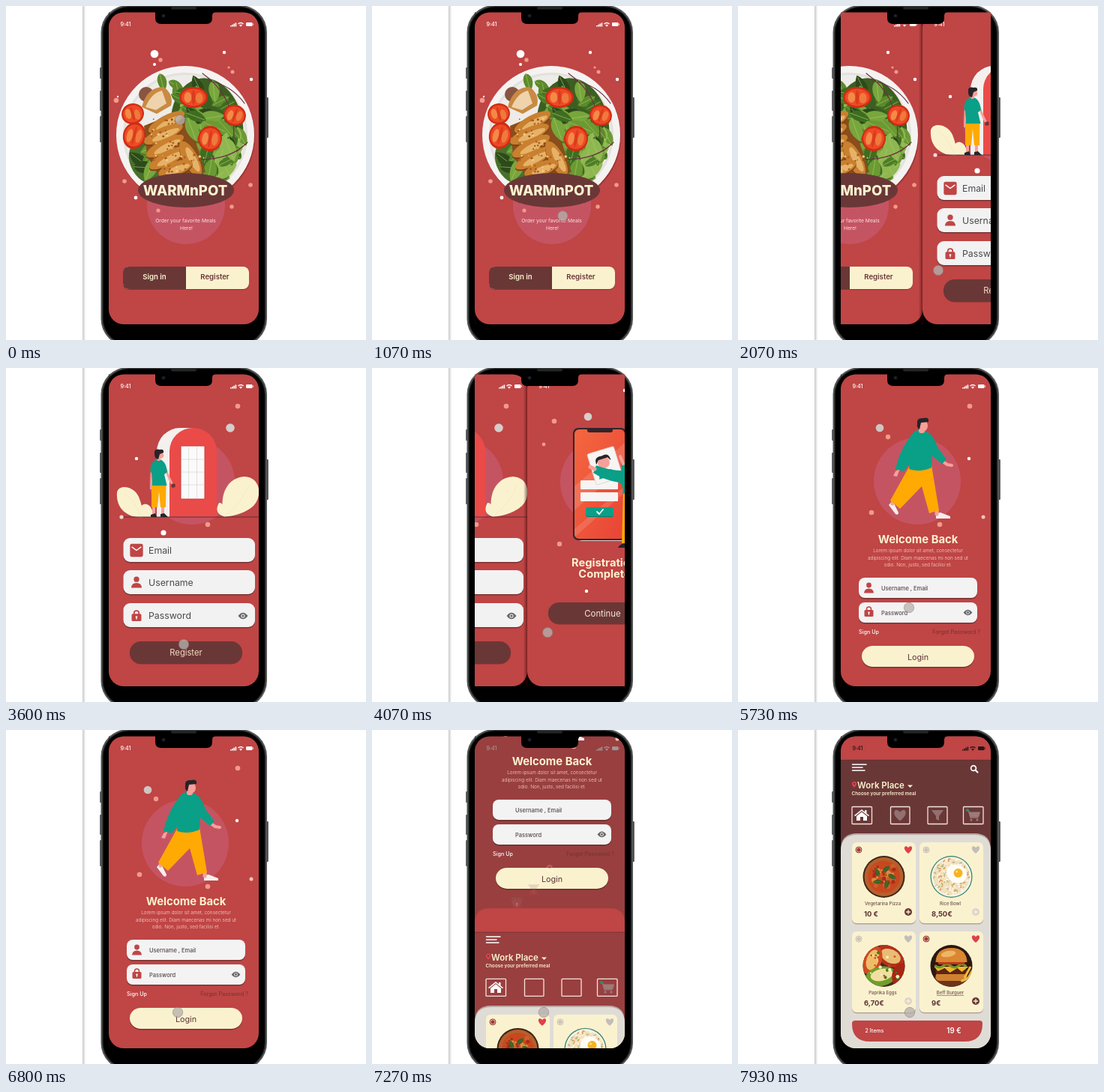
These frames come from a looping animation (480x446 px, 8000 ms). An HTML page:

```html
<!DOCTYPE html>
<html lang="en">
<head>
<meta charset="utf-8">
<title>Food app prototype</title>
<style>
  html, body { margin: 0; width: 100%; height: 100%; overflow: hidden; background: #fff; }
  svg { display: block; width: 100vw; height: 100vh; font-family: Inter, "Open Sans", sans-serif; }
</style>
</head>
<body>
<svg id="stage" viewBox="0 0 480 446"></svg>
<script>
const RED = '#c04545', BROWN = '#6a3737', CREAM = '#faf2cf', PINK = '#c55463',
      SKIN = '#f6a09a', TEAL = '#0a9f87', YELLOW = '#ffa903', INK = '#252429', PEACH = '#f19a8b';

let seed = 7;
const rand = (a, b) => {
  seed = (seed * 16807) % 2147483647;
  return a + (b - a) * seed / 2147483647;
};
const repeat = (n, fn) => Array.from({ length: n }, (_, i) => fn(i)).join('');

// Drawing helpers
const rect = (x, y, w, h, r, fill, more = '') =>
  `<rect x="${x}" y="${y}" width="${w}" height="${h}" rx="${r}" fill="${fill}" ${more}/>`;
const circle = (x, y, r, fill, more = '') => `<circle cx="${x}" cy="${y}" r="${r}" fill="${fill}" ${more}/>`;
const ellipse = (x, y, rx, ry, fill, turn = 0) =>
  `<ellipse rx="${rx}" ry="${ry}" fill="${fill}" transform="translate(${x} ${y}) rotate(${turn})"/>`;
const shape = (d, fill, more = '') => `<path d="${d}" fill="${fill}" ${more}/>`;
const line = (d, color, width = 1) =>
  shape(d, 'none', `stroke="${color}" stroke-width="${width}" stroke-linecap="round" stroke-linejoin="round"`);
const at = (x, y, body, scale = 1) => `<g transform="translate(${x} ${y}) scale(${scale})">${body}</g>`;
const group = (id, body, more = '') => `<g id="${id}" ${more}>${body}</g>`;
// x, y is the left or middle point of the text, on its visual centre line
const text = (x, y, size, weight, fill, str, anchor = 'middle', more = '') =>
  `<text x="${x}" y="${y + size * .36}" font-size="${size}" font-weight="${weight}" fill="${fill}" text-anchor="${anchor}" ${more}>${str}</text>`;
const dots = (color, ...list) => list.map(([x, y, r]) => circle(x, y, r, color)).join('');
const pill = (y, h, fill, x = 165, w = 150, r = 15) =>
  rect(x, y + 1.5, w, h, r, '#40202088') + rect(x, y, w, h, r, fill);

// Icons, centred on 0,0
const heart = c => shape('M0 5 C-8 -1 -5 -6 -2 -4.5 Q0 -3.7 0 -2.5 Q0 -3.7 2 -4.5 C5 -6 8 -1 0 5Z', c);
const userHead = c => circle(0, -4, 3.4, c);
const userBody = c => shape('M-6.5 6.5 Q-6 .5 0 .5 Q6 .5 6.5 6.5Z', c);
const lock = c => line('M-3 -1 V-3 A3 3 0 0 1 3 -3 V-1', c, 1.6) + rect(-6, -2, 12, 9, 1.5, c) +
  circle(0, 1.8, 1.2, '#fff') + rect(-.5, 2, 1, 3, .4, '#fff');
const mail = rect(-8, -8, 16, 16, 2, RED) + line('M-5.5 -4 L0 0 L5.5 -4', '#fff', 1.3);
const eye = shape('M-6.5 0 Q0 -8.5 6.5 0 Q0 8.5 -6.5 0Z', '#66666a') + circle(0, 0, 2.6, '#f2f2f2') + circle(0, 0, 1.6, '#66666a');
const funnel = c => shape('M-8 -7 H8 L2 1 V7 L-2 5 V1Z', c);
const search = c => circle(-1, -1, 3.4, 'none', `stroke="${c}" stroke-width="1.7"`) + line('M1.7 1.7 L4.5 4.5', c, 2);
const plus = c => circle(0, 0, 5, c) + line('M-2.5 0 H2.5 M0 -2.5 V2.5', CREAM, 1.3);
const house = shape('M-10 0 L0 -8 L4 -4.5 V-7 H6.5 V-2.5 L10 0 L9 1.3 L0 -6 L-9 1.3Z M-7 1 L0 -4.6 L7 1 V7 H2 V2 H-2 V7 H-7Z', '#fff');
const cart = line('M-9 -6 H-6.5 L-4 3 H6', '#9c7b7b', 1.4) + shape('M-6 -4.5 H9 L7 2 H-4Z', '#9c7b7b') +
  circle(-3, 6, 1.6, '#9c7b7b') + circle(5, 6, 1.6, '#9c7b7b') + circle(-8, -7, 2, '#2d8a68');

const statusBar = color => `<g fill="${color}">` + text(159.5, 24.5, 7.2, 500, 'inherit', '9:41') +
  repeat(4, i => `<rect x="${299 + i * 2.2}" y="${26 - i * 1.2}" width="1.6" height="${1.5 + i * 1.2}"/>`) +
  '<path d="M309 23.5 Q313 20 317 23.5 L316 24.5 Q313 22 310 24.5Z M311 25.5 Q313 24 315 25.5 L313 27.7Z"/>' +
  '<rect x="320" y="22" width="8.5" height="5" rx="1.2"/><rect x="329" y="23.5" width=".8" height="2"/></g>';
const screen = (fill, more = '') => rect(137, 8.5, 200, 416.5, 20, fill, more);
// A full page; its left edge throws a soft shadow on the page it pushes away
const page = (more = '') => rect(132, 8, 6, 417, 0, 'url(#seam)') + screen(RED, more);

// Splash
const leaf = (x, y, len, turn, fill, vein = '#a9c96a') => `<g transform="translate(${x} ${y}) rotate(${turn})">` +
  shape(`M${-len} 0 C${-len * .7} ${-len * .7} ${len * .3} ${-len * .7} ${len} 0 C${len * .3} ${len * .6} ${-len * .7} ${len * .6} ${-len} 0Z`, fill) +
  line(`M${-len} 0 H${len * .8}`, vein, .6) + '</g>';
const greens = ['#5c8a2b', '#78a63d', '#3f6d20', '#8fb750', '#4d7d27', '#2c4a1b', '#6b9a33'];
const scatterLeaves = (n, a0, a1, r0, r1) => repeat(n, i => {
  const a = rand(a0, a1), r = rand(r0, r1);
  return leaf(239 + r * Math.cos(a), 170 + r * Math.sin(a), rand(10, 18), rand(0, 360), greens[i % 7]);
});
const tomato = (x, y, rx, ry, turn) => ellipse(x, y, rx, ry, '#cf2c14', turn) + ellipse(x, y, rx * .86, ry * .82, '#ee4a26', turn) +
  ellipse(x - rx * .4, y, rx * .26, ry * .5, '#f38a48', turn) + ellipse(x + rx * .4, y + 1, rx * .26, ry * .5, '#ee7a3c', turn) +
  ellipse(x, y, rx * .12, ry * .7, '#d93c1d', turn);
const slice = (x, y, len, h, turn) => ellipse(x, y + 2, len, h, '#7d4317', turn) + ellipse(x, y, len, h, '#c9802f', turn) +
  ellipse(x + 3, y + 1, len * .7, h * .5, '#e6b268', turn) +
  repeat(12, () => circle(x + rand(-.7, .7) * len, y + rand(-.7, .5) * h, rand(.6, 1.8), ['#8f4a18', '#f0c885', '#b4641f'][Math.floor(rand(0, 3))]));
const salad = () => circle(240, 174, 92, '#9b3636') + circle(239, 172, 92, '#f5f3f1') + circle(239, 172, 83, '#e3e1dd') +
  circle(239, 172, 80, '#eeece8') +
  ellipse(268, 162, 48, 66, '#3c5f21', -8) + ellipse(190, 208, 24, 32, '#48702a', -30) +
  scatterLeaves(26, -2, 1.1, 58, 76) + scatterLeaves(70, -1.9, 1.2, 15, 68) + scatterLeaves(16, 2.2, 2.75, 45, 72) +
  line('M262 90 Q305 120 304 175 M270 100 Q300 105 318 130 M258 205 Q300 205 322 182', '#6d2f43', 1.2) +
  circle(187, 118, 10, '#8a5540') +
  tomato(169, 144, 15, 14, -15) + tomato(171, 173, 15, 18, 15) + tomato(250, 122, 19, 14, 0) +
  tomato(272, 177, 16, 17, 10) + tomato(305, 146, 15, 14, 20) +
  shape('M184 160 L228 142 L246 160 L266 222 L206 228 L188 200Z', '#8a4d1b') +
  shape('M181 135 Q188 108 210 108 Q224 118 220 133 L201 144Z', '#c98a42') + shape('M186 135 Q194 116 208 113 L214 130 L200 139Z', '#eed3ac') +
  slice(214, 155, 27, 9, -28) + slice(210, 171, 28, 9, -24) + slice(212, 187, 28, 9, -28) + slice(216, 203, 28, 9, -28) +
  slice(246, 204, 26, 10, 62) + slice(226, 217, 24, 9, -20) + leaf(248, 165, 17, 70, greens[1]) + leaf(254, 148, 14, 20, greens[2]);
const splash = page() + circle(240, 266, 52, PINK) + salad() +
  dots('#fff', [198, 64, 5.3], [291, 62, 2.2], [327, 98, 2.2], [198, 78, 2], [149, 121, 1.2], [173, 256, 2.4]) +
  dots(PEACH, [206, 72, 2.7], [302, 88, 2.5], [147, 126, 3.3], [158, 234, 2.8], [326, 239, 2.8], [203, 273, 2.6], [301, 268, 2.7], [297, 82, 1.6]) +
  ellipse(240, 246, 64, 23, BROWN) + text(239, 246, 18.6, 800, CREAM, 'WARMnPOT') +
  text(239.5, 287, 6.7, 400, '#fbe3dc', 'Order your favorite Meals') + text(240.5, 296.5, 6.7, 400, '#fbe3dc', 'Here!') +
  rect(156, 349, 168, 30, 8, '#8b3434') + rect(156, 348, 168, 30, 8, CREAM) +
  shape('M164 348 H240 V378 H164 Q156 378 156 370 V356 Q156 348 164 348Z', BROWN) +
  text(198, 362, 9.6, 600, CREAM, 'Sign in') + text(278.5, 362, 9.6, 600, BROWN, 'Register') + statusBar('#fff');

// Register
const field = (y, icon, label) => pill(y, 32, '#f2f2f2', 156.5, 175.5, 9) + at(174, y + 16.5, icon, 1.08) +
  text(190, y + 16.5, 12.3, 400, '#4b4b4f', label, 'start');
const plants = shape('M183 199 C165 201 146 190 148 166 C150 155 170 157 177 172 Q182 184 183 199Z', CREAM) +
  shape('M180 199 Q176 182 186 181.5 Q197 184 195 199Z', CREAM) +
  shape('M291 199 C283 170 295 146 318 145 C340 146 342 172 330 184 Q317 196 291 199Z', CREAM) +
  shape('M292 199 Q276 194 284 180 Q293 180 292 199Z', CREAM) +
  line('M179 197 Q172 176 158 168 M294 196 Q315 180 324 156', '#f1e5bc', .7);
const visitor = shape('M193 131 L196 162 L192 162 Z', SKIN) + line('M211 131 L218 148 L222 156', SKIN, 3) +
  circle(223, 157, 2.8, BROWN) + rect(195, 182, 4, 14, 1, SKIN) + rect(207, 182, 4, 14, 1, SKIN) +
  shape('M194 154 H213.5 L213 186 H206 L204 164 L202 186 H194Z', YELLOW) +
  shape('M193 199 V196 L199 194 L201 199Z M206 199 V195 L211 194 L216 199Z', INK) +
  shape('M192.5 139 Q192 123 203 122 Q213 122 215 139 L211 142 L214.5 157 H195 V140Z', TEAL) +
  rect(201, 117, 5, 7, 2, SKIN) + circle(206, 116.5, 4.3, SKIN) + shape('M198 115 Q197 107 205 109 Q211 108 210 113 L205 115 L203 122 Q198 121 198 115Z', INK);
const register = page() + circle(248, 152, 57, PINK) +
  shape('M201 199 V112 A31 32 0 0 1 232 80 H250 V199Z', '#f3f0ee') + shape('M218 199 V111 A31.5 31 0 0 1 281 111 V199Z', '#ea4b48') +
  rect(233, 104, 32, 71, 1, '#fafafa', 'stroke="#c93d3c"') + line('M243.5 105 V174 M254.5 105 V174 M234 122 H264 M234 139 H264 M234 156 H264', '#d4d4d4', .7) +
  plants + line('M152 199 H337', '#5c2f3a', 1) + visitor +
  dots('#fff', [174, 121, 2.2], [210, 220, 3.6]) + dots('#d5cdca', [299, 80, 5.8]) + dots(PEACH, [309, 51, 3.3], [269, 209, 3.3]) +
  dots('#f6d9d0', [154, 199, 2.6]) +
  field(227, mail, 'Email') + field(270, userHead(RED) + userBody(RED), 'Username') + field(314, lock(RED), 'Password') + at(316, 331, eye) +
  pill(365, 29, BROWN) + text(240, 380, 11.2, 400, '#f5dcc4', 'Register') + statusBar('#fff');

// Registration complete
const climber = line('M284 181 L296 191 L322 203', YELLOW, 14) + shape('M265 161 L290 160 Q300 172 296 190 L283 194 L279 234 H263Z', YELLOW) +
  shape('M319 207 L325 195 L332 196 Q336 206 332 215Z', INK) + shape('M258 240 Q262 233 270 234 H279 L280 240Z', INK) +
  shape('M262 126 L272 127 Q286 131 287 146 Q288 158 291 164 L264 168 Q266 157 260 153 Q240 150 225 140 L229 130 Q247 137 263 137Z', TEAL) +
  line('M265 128 L261 118', SKIN, 4) + line('M227 135 L221 132', SKIN, 5) + rect(273, 122, 7, 8, 3, SKIN) + circle(275.5, 119, 7.5, SKIN) +
  shape('M269 116 Q267 108 276 109 Q285 105 289 115 Q294 128 284 133 Q278 130 279 121 L276 115Z', INK);
const portrait = '<g transform="rotate(-17 240 130)">' + rect(222, 109, 37, 43, 2, '#f7f4f2', 'stroke="#d9cfcb" stroke-width=".7"') +
  circle(240, 126, 8, SKIN) + shape('M230 126 Q229 115 240 117 Q251 114 250 126 L247 121 H234Z', INK) +
  shape('M228 146 Q230 136 240 136 Q251 136 252 146Z', TEAL) + '</g>';
const complete = page() + circle(239, 152, 58, PINK) +
  rect(203, 82, 71, 149, 7, '#d9cdcc') + rect(198, 80, 71, 150, 7, '#33242c') + rect(200, 82, 67, 146, 6, 'url(#glow)') +
  shape('M200 158 L267 100 V130 L200 190Z M200 215 L267 158 V166 L200 226Z', '#ffffff22') +
  rect(217, 80, 34, 6, 3, '#33242c') + rect(208, 150, 50, 12, 1, '#f7f5f4') + rect(208, 166, 50, 12, 1, '#f7f5f4') +
  rect(215, 187, 37, 12, 3, '#087c6b') + rect(215, 186, 37, 12, 3, TEAL) + line('M230 192 L233 195 L238 189', '#fff', 1.8) +
  portrait + climber +
  dots('#fff', [267, 30, 2.2], [308, 121, 2.2], [216, 298, 2.2]) + dots('#d8ceca', [218, 65, 5.3]) +
  dots(PEACH, [173, 71, 3.3], [159, 102, 2.4], [320, 90, 3.2], [180, 235, 3.2], [306, 242, 3.2], [296, 274, 2.4]) +
  text(239.5, 259.5, 14.7, 700, CREAM, 'Registration') + text(240, 274.5, 14.7, 700, CREAM, 'Complete') +
  pill(313, 28, BROWN) + text(237.5, 327.5, 11.4, 400, '#f5e6da', 'Continue') + statusBar('#fff');

// Login
const walker = shape('M215 137 L212 145 L207 144 L210 138 L217 134Z', SKIN) + line('M272 124 L279 129 L285 130', SKIN, 4) +
  shape('M201 183 L206 177 L214 193 Q214 197 210 195Z M264 194 L270 193 L283 198 V201 H264Z', '#f5efec') +
  line('M209 176 L206 181', SKIN, 5) + line('M265 190 V195', SKIN, 5) +
  shape('M228 132 L258 130 L268 190 L255 194 L245 158 L216 188 L203 177Z', YELLOW) +
  shape('M235 85 Q243 80 252 85 Q262 91 266 106 L278 122 L272 128 L259 117 L258 133 Q243 140 228 135 L229 128 L221 138 L210 135 Q216 107 235 85Z', TEAL) +
  rect(241, 77, 8, 10, 3, SKIN) + ellipse(247, 77, 6, 7.5, SKIN) + shape('M239 74 Q238 66 247 67 Q255 65 254 72 L244 73 L242 82 Q238 80 239 74Z', INK);
const input = (y, label) => pill(y, 27, '#f3f3f3', 161, 158, 8) + text(191, y + 14.5, 7.5, 500, '#55484a', label, 'start');
const login = circle(239, 151, 58, PINK) + walker +
  dots('#fff', [308, 121, 2.2]) + dots('#cfc6c2', [189, 80, 5.3]) +
  dots(PEACH, [309, 51, 3.3], [200, 92, 3.2], [178, 193, 3.3], [269, 209, 3.3]) + dots('#f8c4bb', [327, 199, 2.5]) +
  text(240, 228.5, 14.8, 700, CREAM, 'Welcome Back') +
  ['Lorem ipsum dolor sit amet, consectetur', 'adipiscing elit. Diam maecenas mi non sed ut', 'odio. Non, justo, sed facilisi et.']
    .map((row, i) => text(240, 244 + i * 9.5, 6.4, 300, '#f8dcd2', row)).join('') +
  input(280, 'Username , Email') + input(313, 'Password') + at(306.5, 326.5, eye, .9) +
  text(161, 352.5, 7.2, 500, '#fff', 'Sign Up', 'start') + text(323, 352.5, 7.3, 400, BROWN, 'Forgot Password ?', 'end') +
  pill(371, 28, CREAM) + text(240, 386, 10.8, 400, '#5c3434', 'Login');

// Home
const pizza = circle(0, 0, 28, '#3f2418') + circle(0, 0, 26, '#b4602c') + circle(0, 0, 21.5, '#c9471f') +
  repeat(45, () => circle(rand(-14, 14), rand(-14, 14), rand(1.5, 3.5), ['#dc8a3c', '#a82d16', '#c9612a'][Math.floor(rand(0, 3))])) +
  repeat(5, i => leaf(11 * Math.cos(i * 1.26), 11 * Math.sin(i * 1.26), 6, i * 72 + 30, '#3e5f27', '#587a38'));
const rice = circle(0, 0, 28, '#2e7f68') + circle(0, 0, 26.8, '#f7f2e6') + circle(0, 0, 24, '#f0dfbd') +
  repeat(170, i => {
    const a = rand(0, 6.28), r = 24 * Math.sqrt(rand(0, 1));
    return ellipse(r * Math.cos(a), r * Math.sin(a), 2, .9, ['#fff8e8', '#dd9a5c', '#f5e5bb', '#b9b878', '#fdf3dc'][i % 5], rand(0, 180));
  }) +
  ellipse(7, -4, 14, 12, '#fffdf6', 30) + circle(9, -5, 6, '#f7b420') + circle(7, -7, 1.5, '#fde08a');
const peppers = circle(0, 0, 28, '#432b20') + '<g clip-path="url(#dish)">' +
  ellipse(10, -14, 20, 15, '#b5301a', 25) + ellipse(9, -13, 14, 9, '#e8bd73', 25) + ellipse(-16, -8, 13, 20, '#cf4a20', 20) + ellipse(-15, -8, 8, 14, '#eebd68', 20) +
  ellipse(-4, 14, 21, 13, '#6f9e2b', -12) + ellipse(-3, 12, 15, 8, '#f2dfa0', -12) + ellipse(21, 12, 10, 16, '#a82616', 10) +
  repeat(24, () => circle(rand(-18, 20), rand(-18, 18), rand(1, 2.4), ['#d0472a', '#fff0c0', '#4d7826'][Math.floor(rand(0, 3))])) + '</g>';
const burger = circle(0, 0, 28, '#2b1712') + '<g clip-path="url(#dish)">' + rect(-30, 15, 60, 16, 0, '#6c3419') +
  rect(-21, 9, 42, 11, 5, '#cf8030') + rect(-21, 4, 42, 7, 3, '#5a2513') + shape('M-23 1 H23 L14 8 L8 3 L-2 9 L-9 3 L-18 7Z', '#f3b52b') +
  line('M-21 0 q5 4 10 0 t10 0 t10 0 t10 0', '#6d9a2c', 3) + rect(-18, -6, 36, 4, 2, '#c8321e') +
  shape('M-21 -5 Q-20 -24 0 -24 Q20 -24 21 -5Z', '#d98731') + ellipse(-4, -16, 10, 4, '#efb566', -10) +
  line('M18 15 L25 2 M22 17 L28 6 M14 20 L29 14', '#f0bb45', 3) + '</g>';
const card = (x, y, dish, name, price, liked, picked, added, more) => at(x, y,
  rect(0, 1.5, 85, 108, 6, '#b3a59a') + rect(0, 0, 85, 108, 6, CREAM) +
  circle(9, 10, 4, 'none', `stroke="${picked ? '#8c3434' : '#c6bfb5'}" stroke-width="1"`) + circle(9, 10, 2.7, picked ? '#a83838' : '#c9c3ba') +
  at(75, 10, heart(liked ? '#e0404a' : '#c3bdba')) + at(42.5, 46, dish) +
  text(41, 82, 6, 500, '#6b5148', name, 'middle', more) + text(16, 95.5, 9.4, 700, '#5c3030', price, 'start') +
  at(75, 93, plus(added ? BROWN : '#dcd3ca')));
const iconBox = (x, w) => rect(x, 102.5, w, 23, 1, 'none', 'stroke="#f4e4dc" stroke-width="1.3"');
const home = shape('M137 28 Q137 8 157 8 H317 Q337 8 337 28 V40 H137Z', RED) +
  rect(137, 40, 200, 120, 0, BROWN, 'id="header"') + rect(137, 39.5, 200, 1.2, 0, '#4d252566') +
  line('M152.5 46 H171 M152.5 50 H166 M152.5 54 H169', '#fff', 1.5) +
  shape('M155 77 Q151 72.5 152 71 A3.1 3.1 0 0 1 158 71 Q159 72.5 155 77Z', '#e0404a') + circle(155, 71.8, 1.2, BROWN) +
  text(159, 73.5, 11.5, 600, CREAM, 'Work Place', 'start') + shape('M226 73.5 H233 L229.5 77Z', CREAM) +
  text(151.5, 84.5, 6.35, 600, CREAM, 'Choose your preferred meal', 'start') +
  iconBox(152, 26.5) + iconBox(203.5, 25.5) + iconBox(253, 26) + iconBox(300.5, 26.5) + at(165, 114, house) + at(314, 114, cart) +
  shape('M137 160 Q137 138 159 138 H315 Q337 138 337 160 V426 H137Z', '#b9a8a4') +
  shape('M137 162 Q137 140 159 140 H315 Q337 140 337 162 V426 H137Z', '#dfdcd6') +
  card(152, 150, pizza, 'Vegetarina Pizza', '10 €', true, true, true) + card(242, 150, rice, 'Rice Bowl', '8,50€', false, false, false) +
  card(152, 269, peppers, 'Paprika Eggs', '6,70€', false, false, false) +
  card(242, 269, burger, 'Beff Burguer', '9€', true, true, true, 'text-decoration="underline"') +
  shape('M156 388 H322 Q326 388 326 392 Q326 416 302 416 H176 Q152 416 152 392 Q152 388 156 388Z', RED) +
  text(169.5, 401.5, 7.1, 500, '#fff', '2 Items', 'start') + text(288, 401.5, 9.7, 600, '#fff', '19 €');

// Login icons that travel and turn into home icons: [from, to, start look, end look]
const morphs = [
  [[174.5, 325], [216, 114], lock(RED), at(0, 0, heart('#927070'), 1.5)],
  [[174.5, 294], [266, 114], userBody(RED), funnel('#927070')],
  [[174.5, 294], [315, 52], userHead(RED), search('#fff')],
];

const phone = repeat(3, i => rect(125.2, [82, 113, 147][i], 3, [15, 27, 35][i], 1, '#48494a')) + rect(346.5, 122, 3.3, 54, 1, '#48494a') +
  rect(126.5, -1, 221.5, 455, 36, '#545656') + rect(128.5, .5, 217.5, 452, 35, '#1c1d1d') + rect(130, 1.5, 214.5, 450, 34, '#000');
const notch = shape('M193 8 H199 Q199 8 199 13 V16 Q199 24 207 24 H267 Q275 24 275 16 V13 Q275 8 281 8 V4 H193Z', '#000') +
  rect(220, 1, 34, 3.5, 1.7, '#232425') + circle(210, 13, 2.6, '#12161f') + circle(210, 13, 1, '#26344a');

document.getElementById('stage').innerHTML = `<defs>
  <clipPath id="window">${rect(137, 8, 200, 417, 0, '#000')}</clipPath>
  <clipPath id="glass">${screen('#000')}</clipPath>
  <clipPath id="dish">${circle(0, 0, 28, '#000')}</clipPath>
  <linearGradient id="edge"><stop stop-color="#c8c8c8"/><stop offset="1" stop-color="#fff"/></linearGradient>
  <linearGradient id="seam"><stop stop-color="#300" stop-opacity="0"/><stop offset="1" stop-color="#300" stop-opacity=".6"/></linearGradient>
  <linearGradient id="glow" x2="1" y2="1"><stop stop-color="#f4673f"/><stop offset="1" stop-color="#e84436"/></linearGradient></defs>` +
  rect(102, 0, 4.5, 446, 0, 'url(#edge)') + phone +
  `<g clip-path="url(#window)">${group('splash', splash)}${group('register', register)}${group('complete', complete)}` +
  group('account', page('id="backdrop"') + `<g clip-path="url(#glass)">${group('login', login)}${group('home', home)}</g>` +
    morphs.map((m, i) => group('morph' + i, `<g>${m[2]}</g><g>${m[3]}</g>`)).join('') + group('status', statusBar('inherit'))) +
  '</g>' + notch + '<circle id="cursor" r="6.7" fill="#b5aeaa" stroke="#8a7d7a" stroke-width=".8"/>';

// Motion
const LOOP = 8000;
const smooth = u => { u = Math.min(1, Math.max(0, u)); return u * u * (3 - 2 * u); };
const progress = (t, start, length) => smooth((t - start) / length);
const mix = (a, b, p) => a + (b - a) * p;
const mixColor = (a, b, p) => `rgb(${a.map((v, i) => Math.round(mix(v, b[i], p)))})`;
const el = Object.fromEntries([...document.querySelectorAll('[id]')].map(node => [node.id, node]));
const pages = [el.splash, el.register, el.complete, el.account];
const move = (node, x, y) => node.setAttribute('transform', `translate(${x} ${y})`);

// Pointer path: time, x, y, opacity
const pointer = [[0, 232, 152, .8], [300, 232, 152, .8], [1600, 267, 353, .8], [2500, 267, 353, .8], [3200, 237, 369, .8],
  [3700, 237, 369, .8], [4700, 228, 318, .8], [4950, 228, 318, .2], [5100, 228, 318, .2], [5300, 228, 320, .7],
  [5800, 228, 320, .7], [6600, 229, 377, .75], [8000, 229, 377, .75]];

function draw(t) {
  const scroll = progress(t, 1742, 700) + progress(t, 3650, 700) + progress(t, 5030, 680);
  pages.forEach((node, i) => {
    node.style.display = Math.abs(i - scroll) < 1 ? '' : 'none';
    move(node, 200 * (i - scroll), 0);
  });

  const rise = progress(t, 6945, 700);
  move(el.login, 0, -417 * rise);
  move(el.home, 0, 417 * (1 - rise));
  el.home.style.display = rise ? '' : 'none';
  const shade = mixColor([192, 69, 69], [106, 55, 55], rise);
  el.backdrop.setAttribute('fill', shade);
  el.header.setAttribute('fill', shade);
  el.status.setAttribute('fill', mixColor([255, 255, 255], [40, 22, 22], rise));
  morphs.forEach(([from, to], i) => {
    const node = el['morph' + i];
    move(node, mix(from[0], to[0], rise), mix(from[1], to[1], rise));
    node.children[0].style.opacity = (1 - rise) ** 2;
    node.children[1].style.opacity = rise ** 2;
  });

  const k = pointer.findIndex(key => key[0] > t);
  const [a, b] = [pointer[k - 1], pointer[k]];
  const p = progress(t, a[0], b[0] - a[0]);
  move(el.cursor, mix(a[1], b[1], p), mix(a[2], b[2], p));
  el.cursor.setAttribute('opacity', mix(a[3], b[3], p));
}

const began = performance.now();
function tick() {
  draw((performance.now() - began) % LOOP);
  requestAnimationFrame(tick);
}
tick();
</script>
</body>
</html>
```
